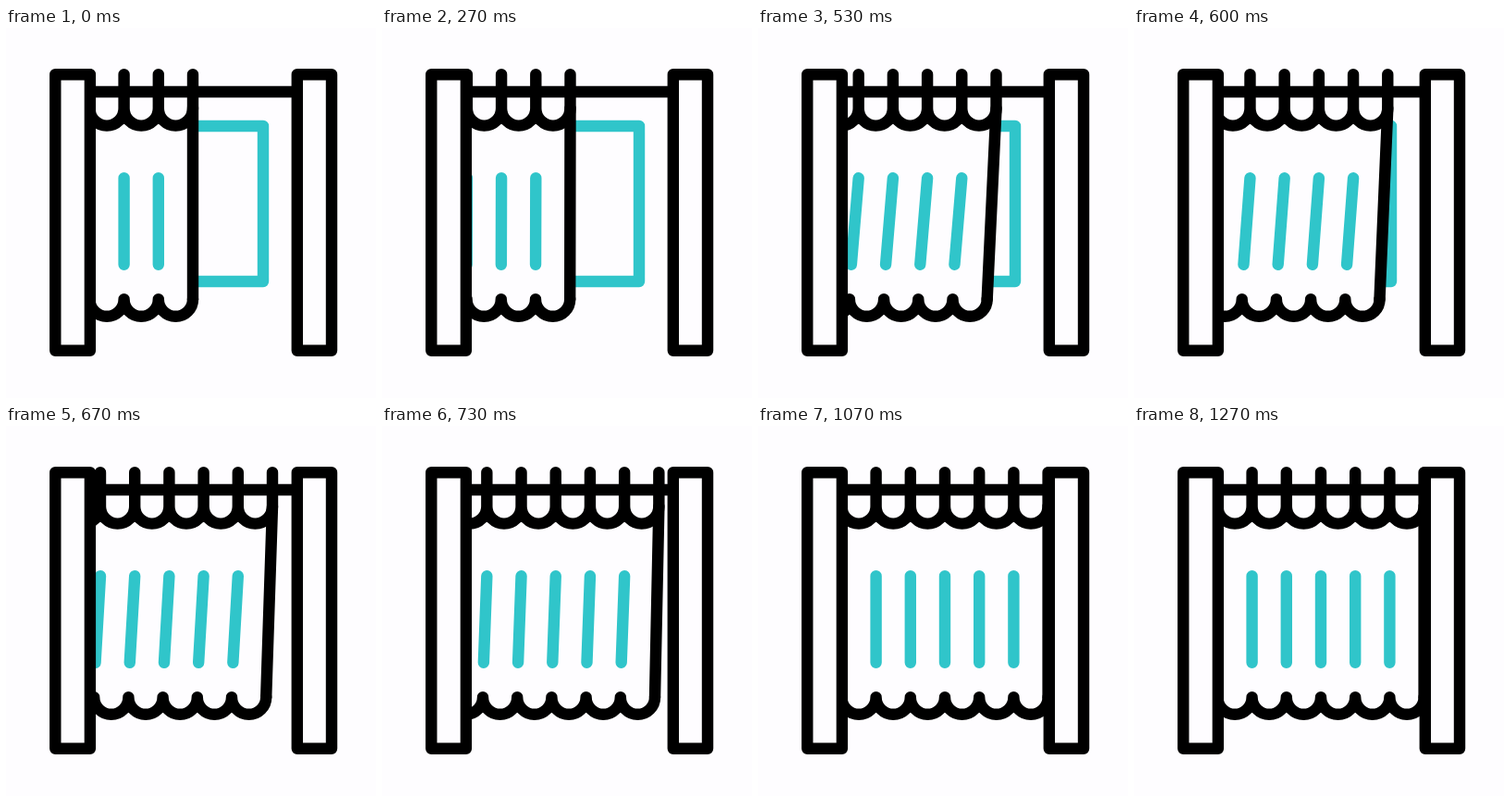
Write an HTML page that moves like this. It is 400 px wide and 400 px high and loops after 1.4 s.

```html
<!DOCTYPE html>
<html lang="en">
<head>
<meta charset="utf-8">
<title>Curtain</title>
<style>
  html, body { margin: 0; height: 100%; overflow: hidden; background: #fefdff; }
  svg { display: block; width: 100%; height: 100%; }
  .ink { fill: none; stroke: #000; }
  .teal { fill: none; stroke: #30c5ca; }
  .post { fill: #fefdff; stroke: #000; }
</style>
</head>
<body>
<svg viewBox="0 0 400 400" stroke-width="12.4" stroke-linecap="round" stroke-linejoin="round">
  <clipPath id="room"><rect x="70" y="0" width="260" height="400"/></clipPath>
  <path class="teal" d="M150 106H278V274H150"/>
  <g clip-path="url(#room)">
    <path id="cloth" fill="#fefdff"/>
    <path class="ink" d="M91 69H315"/>
    <path id="stripes" class="teal"/>
    <path id="edge" class="ink"/>
    <path id="top" class="ink"/>
    <path id="hem" class="ink"/>
  </g>
  <rect class="post" x="53.3" y="50.2" width="37.6" height="298.6"/>
  <rect class="post" x="314.8" y="50.2" width="37.2" height="298.6"/>
</svg>
<script>
const PITCH = 37.2, START = 202, TOP = 87, HEM = 293.2, LOOP = 1400;
const el = id => document.getElementById(id);
const set = (id, d) => el(id).setAttribute('d', d);

// Keys in ticks of 1/15 s: how far the curtain has slid, and how far its hem lags behind.
const ticks = [0, 4, 6, 8, 10, 13, 16];
const slide = [0, 1.5, 17.3, 55.5, 86, 111.3, 111.6];
const lag = [0, 0.3, 4.8, 9.8, 6.8, 0.2, 0];

// Monotone cubic through the keys
function at(values, k) {
  const last = ticks.length - 1;
  if (k >= ticks[last]) return values[last];
  const i = ticks.findIndex(t => t > k) - 1;
  const slope = j => (values[j + 1] - values[j]) / (ticks[j + 1] - ticks[j]);
  const tangent = j => {
    if (j === 0 || j === last) return 0;
    const a = slope(j - 1), b = slope(j);
    return a * b > 0 ? 2 * a * b / (a + b) : 0;
  };
  const h = ticks[i + 1] - ticks[i], u = (k - ticks[i]) / h, v = 1 - u;
  return v * v * ((1 + 2 * u) * values[i] + u * h * tangent(i))
       + u * u * ((1 + 2 * v) * values[i + 1] - v * h * tangent(i + 1));
}

const folds = draw => [0, 1, 2, 3, 4, 5].map(n => draw(n * PITCH)).join('');
const arc = `a18.6 18.6 0 0 1 ${-PITCH} 0`;

function draw(k) {
  const x = START + at(slide, k), lean = at(lag, k), foot = x - lean;
  set('cloth', `M0 80H${x}V${TOP}L${foot} ${HEM}V300H0Z`);
  set('edge', `M${x} ${TOP}L${foot} ${HEM}`);
  set('top', folds(d => `M${x - d} 50.2V${TOP}${arc}`));
  set('hem', folds(d => `M${foot - d} ${HEM}${arc}`));
  set('stripes', folds(d => `M${x - d - PITCH} 162.2l${-0.8 * lean} 93.6`));
}

function frame(now) {
  const t = now % LOOP;
  draw(Math.floor((Math.floor(t / 10) + 0.5) * 0.15));
  requestAnimationFrame(frame);
}
draw(0);
requestAnimationFrame(frame);
</script>
</body>
</html>
```
